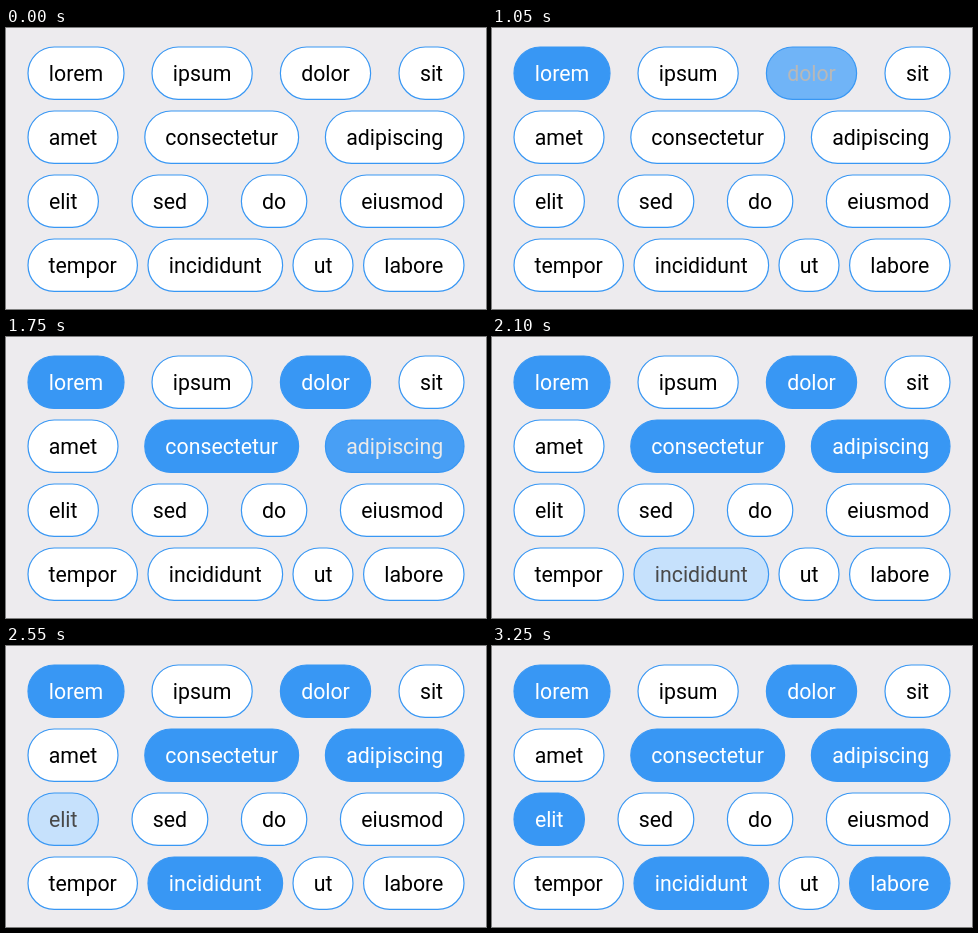
An HTML page for the animation above (3.3 s loop, 480 by 281 pixels).

```html
<!DOCTYPE html>
<html lang="en">
<head>
<meta charset="utf-8">
<title>Tag chips</title>
<style>
  html, body { margin: 0; height: 100%; overflow: hidden; background: #edebee; }
  svg { display: block; width: 480px; height: 281px; }
  rect { stroke: #3897f4; stroke-width: 1.2px; }
  text { font: 21.3px Roboto, sans-serif; text-anchor: middle; }
</style>
</head>
<body>
<svg viewBox="0 0 480 281"></svg>
<script>
const LOOP = 3300, FADE = 260;
const BLUE = [56, 151, 244], WHITE = [255, 255, 255], BLACK = [0, 0, 0];

// Each chip: label, left edge, right edge, time of selection
const rows = [
  [['lorem', 22, 118, 580], ['ipsum', 146, 246.2], ['dolor', 274.4, 364.6, 980], ['sit', 393, 458]],
  [['amet', 22, 112], ['consectetur', 138.8, 292.6, 1230], ['adipiscing', 319.4, 458, 1630]],
  [['elit', 22, 92.4, 2530], ['sed', 126, 201.8], ['do', 235.4, 300.8], ['eiusmod', 334.4, 458]],
  [['tempor', 22, 131.4], ['incididunt', 142, 276.6, 2080], ['ut', 287, 347], ['labore', 357.6, 458, 2980]]
];

const svg = document.querySelector('svg');

function add(tag, attrs) {
  const el = document.createElementNS(svg.namespaceURI, tag);
  for (const key in attrs) el.setAttribute(key, attrs[key]);
  return svg.appendChild(el);
}

const chips = rows.flatMap((row, i) => row.map(([label, left, right, start = Infinity]) => {
  const y = 19 + i * 64;
  const box = add('rect', { x: left, y, width: right - left, height: 52.4, rx: 26.2 });
  const text = add('text', { x: (left + right) / 2, y: y + 34 });
  text.textContent = label;
  return { box, text, start };
}));

const mix = (a, b, k) => `rgb(${a.map((v, i) => Math.round(v + (b[i] - v) * k))})`;

function progress(t) {
  const k = Math.min(1, Math.max(0, t / FADE));
  return 1 - (1 - k) ** 4;
}

function draw() {
  const t = performance.now() % LOOP;
  for (const { box, text, start } of chips) {
    const k = progress(t - start);
    box.style.fill = mix(WHITE, BLUE, k);
    text.style.fill = mix(BLACK, WHITE, k);
  }
  requestAnimationFrame(draw);
}
draw();
</script>
</body>
</html>
```
